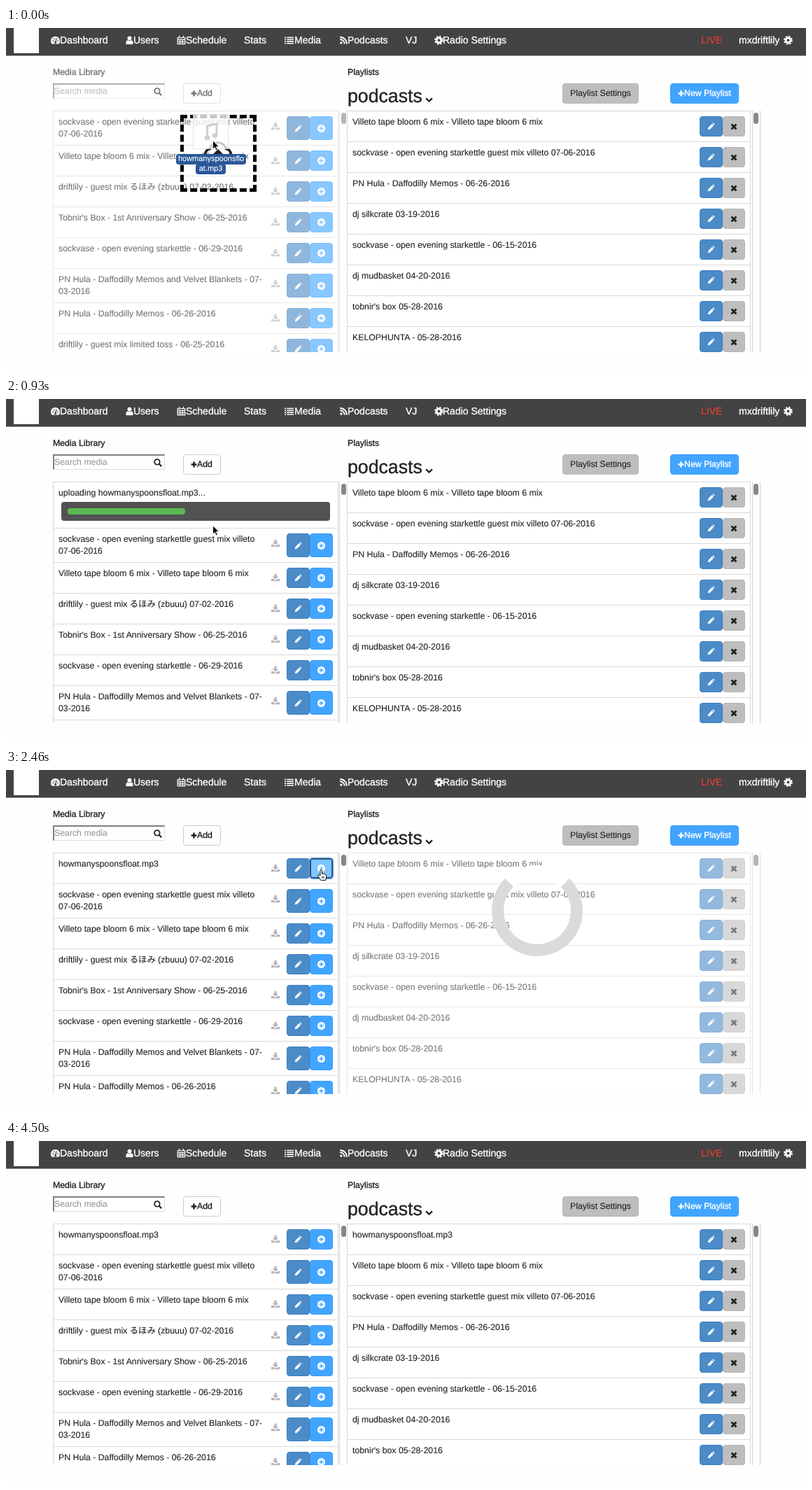
Animation, 1143 px wide and 490 px high, one loop 4.6 s. Source, as an HTML page:

```html
<!DOCTYPE html>
<html lang="en">
<head>
<meta charset="utf-8">
<title>Media library</title>
<style>
html, body { margin: 0; width: 100%; height: 100%; overflow: hidden; background: #fefefe; }
body {
  position: relative; color: #222; white-space: nowrap;
  font: 12.3px/17px "Liberation Sans", "Noto Sans CJK JP", Arial, sans-serif;
  text-rendering: geometricPrecision; -webkit-text-stroke: .12px;
}
body *, body *::before { box-sizing: border-box; }
svg { display: block; overflow: visible; }
.abs, .btn, .title, .dl { position: absolute; }
.mid { -webkit-text-stroke: .35px; }
.anim { animation: 4.6s step-end infinite; }

.nav { position: absolute; left: 0; top: 0; width: 100%; height: 40px; background: #434343; border-bottom: 1px solid #8c8c8c; color: #fff; font-size: 14px; }
.logo { left: 11px; top: 0; width: 36px; height: 36px; background: #fff; }
.btn { display: flex; align-items: center; justify-content: center; border: 1px solid transparent; border-radius: 4px; color: #fff; }
.edit { background: #4b8bc8; border-color: #407fbd; }
.add { background: #41a5ff; border-color: #389dfa; }
.del { background: #bebebe; border-color: #b6b6b6; color: #222; }
.plain { background: #fff; border-color: #ccc; }

.search { left: 67px; top: 79px; width: 160px; height: 22px; border: solid #ddd; border-width: 2px 1px 1px 2px; border-top-color: #808080; border-left-color: #808080; background: #fff; }
.list { position: absolute; top: 118px; height: 345px; border: 1px solid #d8d8d8; border-bottom: 0; overflow: hidden; background: #fff; }
.row { position: relative; height: 44px; border-bottom: 1px solid #d8d8d8; overflow: hidden; }
.row.two { height: 49px; }
.title { left: 7px; top: 7px; }
.dl { left: 311px; top: 15px; color: #b4b4b4; }
.row .btn { top: 7px; bottom: 7px; width: 33px; }
.left .edit { left: 333px; }
.left .add { left: 366px; }
.right .edit { left: 503px; }
.right .del { left: 536px; width: 32px; }
.line { position: absolute; top: 118px; width: 1px; height: 345px; background: #d0d0d0; }
.thumb { position: absolute; top: 121px; width: 7px; height: 16px; border-radius: 4px; background: #868686; }

.bar { left: 11px; top: 28px; width: 384px; height: 27px; border-radius: 4px; background: #525252; }
.fill { left: 9px; top: 9px; height: 9px; width: 0; border-radius: 4px; background: #5cb955; animation-name: fill; }
.left-pane { animation-name: wake; }
.right-pane { animation-name: busy; }
.upload { height: 0; border-width: 0; animation-name: upload; }
.fresh { height: 0; border-width: 0; animation-name: fresh; }
.fresh .title { animation-name: named; }
.fresh .add { border-color: transparent; background-clip: border-box; animation-name: press; }
.queued { height: 0; border-width: 0; animation-name: queued; }
.drop { left: 249px; top: 124px; width: 109px; height: 110px; border: 5px dashed #000; animation-name: drop; }
.ghost { left: 243px; top: 123px; width: 100px; height: 86px; animation-name: ghost; }
.file { left: 24px; top: 0; width: 51px; height: 50px; background: rgba(255,255,255,.78); border: 1px solid rgba(200,200,200,.5); color: #cfcfcf; }
.tag { height: 15px; border-radius: 4px; background: #2a5799; color: #fff; font-size: 11px; line-height: 14px; text-align: center; }
.spin { left: 694px; top: 136px; width: 130px; height: 130px; border: 17px solid #dadada; border-top-color: #fff; border-radius: 50%; opacity: 0; animation-name: spin; }
.cursor { left: 0; top: 0; animation-name: move; }
.cursor svg { position: absolute; opacity: 0; }
.arrow { animation-name: arrow; }
.ibeam { left: -3px; top: -7px; animation-name: ibeam; }
.hand { left: -5px; animation-name: hand; }

@keyframes wake { 0% { opacity: .62 } 16.95% { opacity: .8 } 20.21%, 100% { opacity: 1 } }
@keyframes busy { 0% { opacity: 1 } 53.47% { opacity: .6 } 59.34%, 100% { opacity: 1 } }
@keyframes drop { 0% { opacity: 1 } 15%, 100% { opacity: 0 } }
@keyframes ghost {
  0% { transform: none; opacity: 1 }
  1.95% { transform: translateY(20px); opacity: 1 }
  5.21% { transform: translateY(23px); opacity: 1 }
  13.04%, 100% { transform: translateY(23px); opacity: 0 }
}
@keyframes upload { 15% { height: 66px; border-width: 0 0 1px } 32.39%, 100% { height: 0; border-width: 0 } }
@keyframes fill {
  0% { width: 30px }
  16.95% { width: 85px }
  20.21% { width: 168px; animation-timing-function: steps(4) }
  28.47%, 100% { width: 366px }
}
@keyframes fresh { 0% { height: 0; border-width: 0 } 32.39%, 100% { height: 44px; border-width: 0 0 1px } }
@keyframes named { 0% { opacity: 0 } 34.34%, 100% { opacity: 1 } }
@keyframes queued { 0% { height: 0; border-width: 0 } 59.34%, 100% { height: 44px; border-width: 0 0 1px } }
@keyframes press {
  0% { background: #41a5ff; border-color: #389dfa; box-shadow: none }
  49.78% { background: #2f8ee6; border-color: #24558c; box-shadow: inset 0 0 0 1px #24558c, 0 0 2px 1px #6d9fd4 }
  53.47% { background: #7fc5ff; border-color: #24558c; box-shadow: inset 0 0 0 1px #24558c, 0 0 2px 1px #6d9fd4 }
  59.34% { background: #559341; border-color: #2b5a6d; box-shadow: inset 0 0 0 1px #2b5a6d, 0 0 2px 1px #6d9fd4 }
  97.82%, 100% { background: #41a5ff; border-color: #389dfa; box-shadow: none }
}
@keyframes spin {
  0% { opacity: 0; transform: none }
  53.47% { opacity: 1; transform: none; animation-timing-function: steps(3) }
  59.33% { opacity: 1; transform: rotate(48deg) }
  59.34%, 100% { opacity: 0; transform: none }
}
@keyframes move {
  0% { transform: translate(295px, 161px) }
  1.95% { transform: translate(295px, 181px) }
  5.21% { transform: translate(295px, 183px) }
  13.04% { transform: translate(296px, 183px) }
  15% { transform: translate(295px, 181px) }
  32.39% { transform: translate(296px, 182px); animation-timing-function: steps(5) }
  42.17% { transform: translate(452px, 152px) }
  44.13% { transform: translate(451px, 146px) }
  45.86% { transform: translate(450px, 142px) }
  67.17% { transform: translate(450px, 142px); animation-timing-function: steps(6) }
  78.69% { transform: translate(986px, 440px) }
  80.43% { transform: translate(1000px, 447px) }
  82.39% { transform: translate(1030px, 460px) }
  84.13%, 100% { transform: translate(1075px, 478px) }
}
@keyframes arrow {
  0% { opacity: 1 } 13.04% { opacity: 0 } 15% { opacity: 1 } 32.39% { opacity: 0 }
  38.25% { opacity: 1 } 40.2% { opacity: 0 } 69.09% { opacity: 1 } 78.69% { opacity: 0 }
  82.39% { opacity: 1 } 86.08%, 100% { opacity: 0 }
}
@keyframes ibeam { 13.04% { opacity: 1 } 15% { opacity: 0 } 32.39% { opacity: 1 } 38.25%, 100% { opacity: 0 } }
@keyframes hand { 40.2% { opacity: 1 } 69.09% { opacity: 0 } 78.69% { opacity: 1 } 82.39%, 100% { opacity: 0 } }
</style>
</head>
<body>
<script>
// Icon bodies on a 16-unit grid
const solid = d => `<path fill="currentColor" fill-rule="evenodd" d="${d}"/>`;
const stroke = (d, w) => `<path fill="none" stroke="currentColor" stroke-width="${w}" d="${d}"/>`;
const icons = {
  dash: solid('M2 14.5a8 8 0 1 1 12 0zM3 8h2v2H3zM5 4.5h2v2H5zM11 8h2v2h-2zM9.5 4l-2 6a2 2 0 1 0 1.5 0l2-5.5z'),
  user: solid('M8 1a3.7 3.7 0 1 1 0 7.4a3.7 3.7 0 0 1 0-7.4zM2 15c-1-4 .5-7 3-7q3 2.500 6 0c2.500 0 4 3 3 7z'),
  cal: stroke('M1.5 3.5h13v11h-13zM1.5 7h13M1.5 10.8h13M5.8 7v7.5M10.2 7v7.5M4.5 0v4M11.5 0v4', 1.5),
  list: stroke('M0 3h2.5M4 3h12M0 6.5h2.5M4 6.5h12M0 10h2.5M4 10h12M0 13.5h2.5M4 13.5h12', 2),
  rss: solid('M3.5 10.5a2 2 0 1 1 0 4a2 2 0 0 1 0-4z') + stroke('M1.5 6.5a8 8 0 0 1 8 8M1.5 2.5a12 12 0 0 1 12 12', 2.3),
  gear: '<g fill="none" stroke="currentColor"><circle cx="8" cy="8" r="4.2" stroke-width="3.6"/><circle cx="8" cy="8" r="6.6" stroke-width="2.6" stroke-dasharray="2.9 2.284"/></g>',
  pencil: solid('M1 15l1-4.5 7.5-7.5 3.5 3.5-7.5 7.5zM10.5 2l1.5-1.5 3.5 3.5-1.5 1.5z'),
  plusRound: solid('M8 0a8 8 0 1 1 0 16a8 8 0 0 1 0-16zM6.8 3.5v3.3H3.5v2.4h3.3v3.3h2.4V9.2h3.3V6.8H9.2V3.5z'),
  plus: stroke('M8 1v14M1 8h14', 4.5),
  cross: stroke('M2.5 2.5l11 11M13.5 2.5l-11 11', 4.5),
  down: solid('M6 1h4v5h3.5L8 11.5 2.5 6H6zM0 10.5h4l4 3 4-3h4V15H0z'),
  find: '<circle cx="6.5" cy="6.5" r="5" fill="none" stroke="currentColor" stroke-width="2.4"/>' + stroke('M10 10l5 5', 3),
  chevron: stroke('M1.5 5l6.5 6 6.5-6', 3.4),
  note: stroke('M5 13V3l8-2v10', 1.8) + solid('M5 11a2.3 2 0 1 1-.1 4a2.3 2 0 0 1 .1-4zM11.5 9a2.3 2 0 1 1-.1 4a2.3 2 0 0 1 .1-4z'),
  cloud: stroke('M6.5 12H4a3.3 3.3 0 0 1-.4-6.5a4.6 4.6 0 0 1 8.8 0a3.3 3.3 0 0 1-.4 6.5H9.5M8 12.5V7M5.8 9L8 6.8 10.2 9', 1.5)
};
const icon = (name, size) => `<svg width="${size}" height="${size}" viewBox="0 0 16 16">${icons[name]}</svg>`;
const at = (x, y, html, cls = '', css = '') => `<div class="abs ${cls}" style="left:${x}px;top:${y}px;${css}">${html}</div>`;
const box = (x, y, w, h, cls, html) => at(x, y, html, cls, `width:${w}px;height:${h}px`);

const file = 'howmanyspoonsfloat.mp3';
const mix = 'Villeto tape bloom 6 mix - Villeto tape bloom 6 mix';
const show = 'sockvase - open evening starkettle';
const games = 'PN Hula - Daffodilly Memos';

const library = [
  show + ' guest mix villeto<br>07-06-2016', mix,
  'driftlily - guest mix るほみ (zbuuu) 07-02-2016',
  "Tobnir's Box - 1st Anniversary Show - 06-25-2016",
  show + ' - 06-29-2016',
  games + ' and Velvet Blankets - 07-<br>03-2016',
  games + ' - 06-26-2016',
  'driftlily - guest mix limited toss - 06-25-2016'
];
const playlist = [
  mix, show + ' guest mix villeto 07-06-2016', games + ' - 06-26-2016',
  'dj silkcrate 03-19-2016', show + ' - 06-15-2016', 'dj mudbasket 04-20-2016',
  "tobnir's box 05-28-2016", 'KELOPHUNTA - 05-28-2016'
];

const edit = `<div class="btn edit">${icon('pencil', 11)}</div>`;
const mediaRow = (text, cls = '', a = '') =>
  `<div class="row ${cls} ${text.includes('<br>') ? 'two' : ''}"><div class="title ${a}">${text}</div>
  <div class="dl">${icon('down', 12)}</div>${edit}<div class="btn add ${a}">${icon('plusRound', 11)}</div></div>`;
const playRow = (text, cls = '') =>
  `<div class="row ${cls}"><div class="title">${text}</div>${edit}<div class="btn del">${icon('cross', 10)}</div></div>`;

const menu = [
  [77, 'Dashboard', 'dash', 64], [182, 'Users', 'user', 170], [257, 'Schedule', 'cal', 244], [340, 'Stats'],
  [412, 'Media', 'list', 398], [488, 'Podcasts', 'rss', 476], [571, 'VJ'],
  [624, 'Radio Settings', 'gear', 612], [1047, 'mxdriftlily'], [1111, '', 'gear', 1111]
];
const nav = `<div class="nav">${at(11, 0, '', 'logo')}` +
  menu.map(([x, text, ic, ix]) => at(x, 9, text, 'mid') + (ic ? at(ix, 11, icon(ic, 13)) : '')).join('') +
  at(993, 9, 'LIVE', '', 'color:#f23c2e') + '</div>';

const upload = `<div class="row upload anim"><div class="title">uploading ${file}...</div>
  <div class="abs bar"><div class="abs fill anim"></div></div></div>`;

const left = `<div class="left-pane anim">
  ${at(67, 55, 'Media Library', 'mid')}
  <div class="abs search">${at(0, 1, 'Search media', '', 'color:#999')}${at(142, 4, icon('find', 12))}</div>
  ${box(253, 79, 54, 29, 'btn plain', '')}
  ${at(264, 89, icon('plus', 9))}${at(273, 85, 'Add', 'mid')}
  <div class="list left" style="left:67px;width:408px">${upload}${mediaRow(file, 'fresh anim', 'anim')}${library.map(t => mediaRow(t)).join('')}</div>
  <div class="line" style="left:476px"></div><div class="thumb" style="left:479px"></div></div>`;

const right = at(488, 55, 'Playlists', 'mid') +
  at(488, 82, 'podcasts', 'mid', 'font-size:26.7px;line-height:30px') + at(599, 97, icon('chevron', 11)) +
  box(795, 79, 109, 29, 'btn del', 'Playlist Settings') +
  box(949, 79, 98, 29, 'btn add mid', icon('plus', 9) + 'New Playlist') +
  `<div class="right-pane anim">
  <div class="list right" style="left:487px;width:577px">${playRow(file, 'queued anim')}${playlist.map(t => playRow(t)).join('')}</div>
  <div class="line" style="left:1066px"></div><div class="line" style="left:1077px"></div>
  <div class="thumb" style="left:1068px"></div></div><div class="abs spin anim"></div>`;

const drag = `<div class="abs drop anim">${at(28, 29, icon('cloud', 42))}</div>
  <div class="abs ghost anim"><div class="abs file">${at(11, 11, icon('note', 27))}</div>
  ${at(0, 57, file.slice(0, 16), 'tag', 'width:100px')}${at(28, 71, file.slice(16), 'tag', 'width:43px')}</div>`;

const cursor = `<div class="abs cursor anim">
  <svg class="arrow anim" width="10" height="15"><path d="M.5 0v12l2.8-2.6 2 4.5 2-.9-2-4.4h4z" stroke="#fff" stroke-width=".8"/></svg>
  <svg class="ibeam anim" width="6" height="14"><path d="M0 .5q2.5 0 3 1.5q.5-1.5 3-1.5M3 2v10M0 13.5q2.5 0 3-1.5q.5 1.5 3 1.5" fill="none" stroke="#111"/></svg>
  <svg class="hand anim" width="14" height="16"><path d="M4 9V2q0-1.5 1.2-1.5T6.5 2v4.5V5.5q2-.7 2.2 1q1.8-.6 2 .8q1.8-.4 1.9 1.200v3l-1 4H5L1 10q-1-1.6.4-2T4 9zM7 10v3M9 10v3" fill="#fff" stroke="#111"/></svg></div>`;

document.body.innerHTML = nav + left + right + drag + cursor;
</script>
</body>
</html>
```
